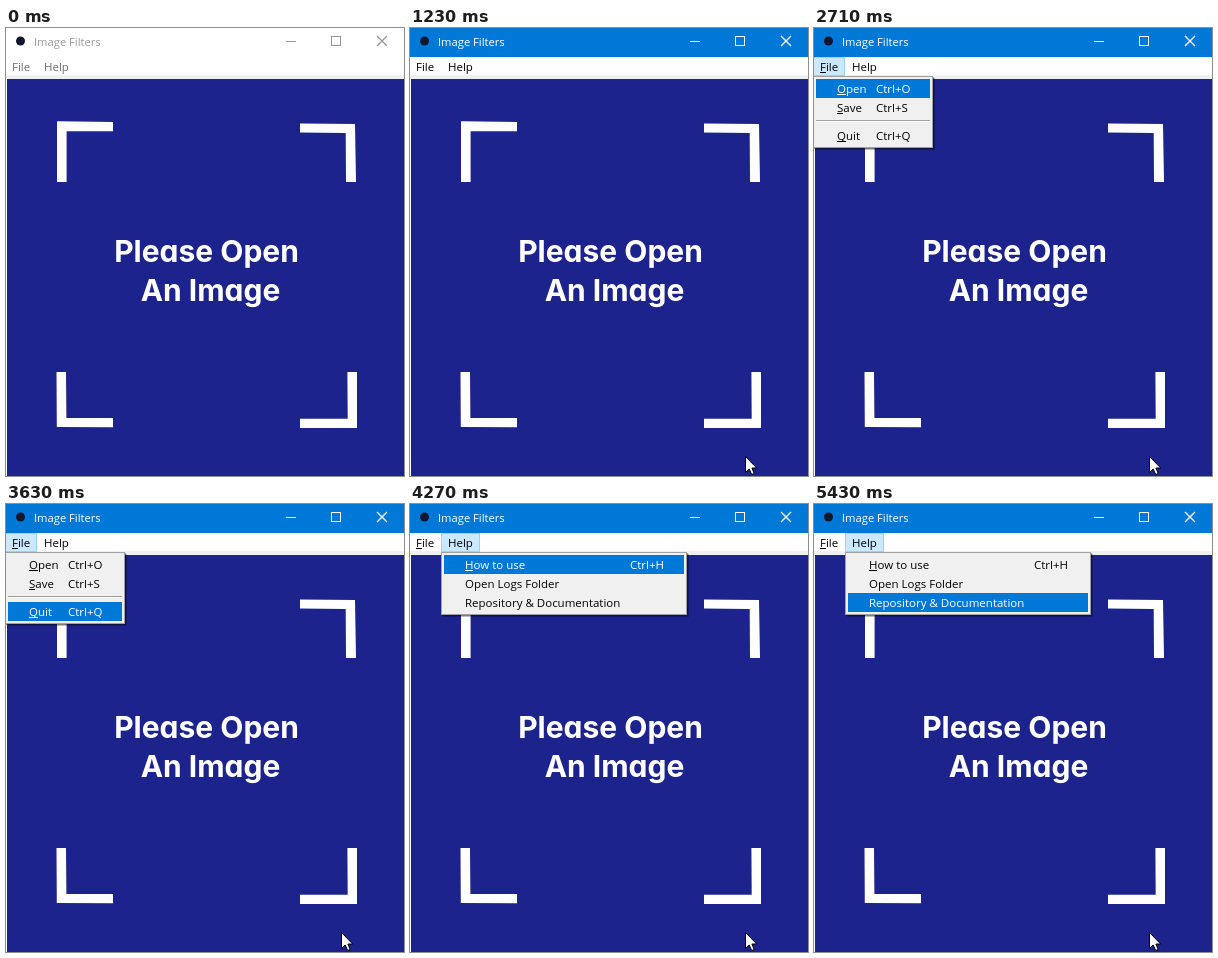
Write an HTML page that moves like this. It is 398 px wide and 448 px high and loops after 5.99 s.

```html
<!DOCTYPE html>
<html lang="en">
<head>
<meta charset="utf-8">
<title>Image Filters</title>
<style>
  html, body { margin: 0; height: 100%; overflow: hidden; }
  svg { display: block; width: 398px; height: 448px; }
  text { font: 500 11.5px "Open Sans", "Noto Sans", sans-serif; white-space: pre; }
  .big { font: 700 30px Inter, sans-serif; font-feature-settings: "cv11"; text-anchor: middle; fill: #fff; }
  .crisp { shape-rendering: crispEdges; }
</style>
</head>
<body>
<svg viewBox="0 0 398 448">
  <rect width="398" height="448" fill="#fff"/>
  <rect id="bar" class="crisp" width="398" height="29"/>
  <circle cx="14.5" cy="13" r="4.5" fill="#101830"/>
  <text id="title" x="28" y="18" style="font-size:11.2px">Image Filters</text>
  <g id="buttons" fill="none">
    <path class="crisp" d="M280 13.5h10M325.5 8.5h9v9h-9z"/>
    <path stroke-width="1.3" d="M371 8l10 10m0-10l-10 10"/>
  </g>

  <rect class="crisp" y="47" width="398" height="4" fill="#f0f0f0"/>
  <rect class="crisp" x="1" y="51" width="397" height="397" fill="#1c238c"/>
  <path fill="#fff" d="M51 93.3L107 94V103.3H60.6V154H51z
    M294 95.5L349 96L350 154H340L339.7 105L294 104.6z
    M50.5 344H60L60.4 390H107V399.3L50.8 399z
    M341.4 344H351V400H294V390.7H341.7z"/>
  <text class="big" x="200.5" y="234">Please Open</text>
  <text class="big" x="204.5" y="273">An Image</text>

  <rect id="tab" class="crisp" y="29.5" height="18" fill="#cce8ff" stroke="#99d1ff"/>
  <g id="labels">
    <text x="6" y="43">File</text>
    <text x="38" y="43">Help</text>
  </g>
  <rect id="mnemonic" class="crisp" x="6" y="44" width="6" height="1"/>
  <g id="menus"></g>
  <path id="cursor" fill="#fff" stroke="#000" stroke-linejoin="round"
    d="M.5 .5V16.5L4.2 13L6.7 18.5L9.2 17.5L6.9 12H11.7z"/>
</svg>
<script>
const $ = id => document.getElementById(id);
const set = (el, attrs) => { for (const k in attrs) el.setAttribute(k, attrs[k]); return el; };
const show = (el, on) => el.style.display = on ? "" : "none";

function add(parent, tag, attrs, content = "") {
  const el = set(document.createElementNS("http://www.w3.org/2000/svg", tag), attrs);
  el.textContent = content;
  return parent.appendChild(el);
}

// Rows are [top, label, shortcut, underline width].
function makeMenu(x, width, height, labelX, keyX, rows) {
  const root = add($("menus"), "g", {});
  const box = (offset, attrs) => add(root, "rect",
    { x: x + offset, y: 48 + offset, width, height, class: "crisp", ...attrs });
  box(2, { fill: "#000", opacity: .25 });
  box(1, { fill: "#000", opacity: .35 });
  box(.5, { width: width - 1, height: height - 1, fill: "#f0f0f0", stroke: "#a0a0a0" });
  const items = rows.map(([y, label, key, line]) => {
    const g = add(root, "g", {});
    const back = add(g, "rect",
      { x: x + 3, y, width: width - 6, height: 19, fill: "#0078d7", class: "crisp" });
    add(g, "text", { x: labelX, y: y + 14 }, label);
    add(g, "text", { x: keyX, y: y + 14 }, key);
    add(g, "rect", { x: labelX, y: y + 15, width: line, height: 1, class: "crisp" });
    return { g, back };
  });
  return { root, items };
}

// The File menu's left border lies just outside the stage.
const fileMenu = makeMenu(-1, 120, 72, 23, 62,
  [[51, "Open", "Ctrl+O", 9], [70, "Save", "Ctrl+S", 6], [98, "Quit", "Ctrl+Q", 9]]);
const ruler = (y, fill) => add(fileMenu.root, "rect", { x: 2, y, width: 114, height: 1, fill, class: "crisp" });
ruler(92, "#a0a0a0");
ruler(93, "#fff");
const helpMenu = makeMenu(31, 246, 63, 55, 220,
  [[51, "How to use", "Ctrl+H", 8], [70, "Open Logs Folder", "", 0], [89, "Repository & Documentation", "", 0]]);

const at = (t, steps) => steps.filter(s => s[0] <= t).pop();
const pointer = [[0, -50, -50], [210, 339, 427], [290, 339, 424], [590, 342, 429],
  [1060, 336, 417], [1140, 330, 424], [1230, 335, 428]];
const fileSteps = [[0, -1], [2710, 0], [3170, 1], [3630, 2], [4180, -1]];
const helpSteps = [[0, -1], [4270, 0], [4810, 1], [5430, 2]];

function updateMenu({ root, items }, selected) {
  show(root, selected >= 0);
  items.forEach(({ g, back }, i) => {
    set(g, { fill: i === selected ? "#fff" : "#000" });
    show(back, i === selected);
  });
}

function draw(t) {
  const active = t >= 910, help = t >= 4180;
  set($("bar"), { fill: active ? "#0078d7" : "#fff" });
  set($("title"), { fill: active ? "#fff" : "#999" });
  set($("buttons"), { stroke: active ? "#fff" : "#999" });
  set($("labels"), { fill: active ? "#000" : "#6d6d6d" });
  show($("mnemonic"), t >= 2010);
  show($("tab"), t >= 2160);
  set($("tab"), { x: help ? 31.5 : -.5, width: help ? 38 : 31 });
  updateMenu(fileMenu, at(t, fileSteps)[1]);
  updateMenu(helpMenu, at(t, helpSteps)[1]);
  const [, x, y] = at(t, pointer);
  set($("cursor"), { transform: `translate(${x} ${y})` });
}

const start = performance.now();
function frame() {
  draw((performance.now() - start) % 5990);
  requestAnimationFrame(frame);
}
frame();
</script>
</body>
</html>
```
